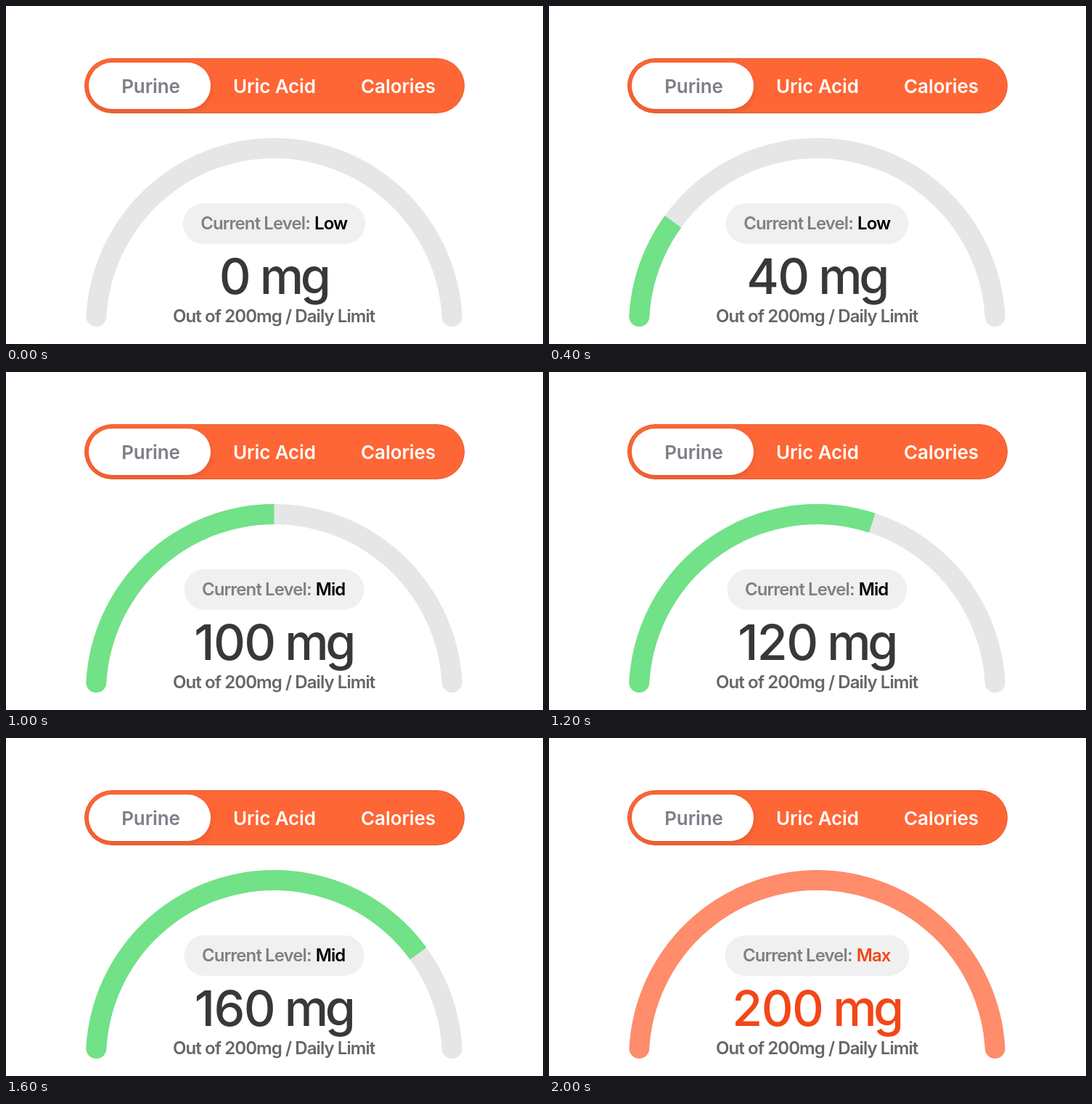
An HTML page that plays this animation: 740 px wide and 466 px high, repeating every 3000 ms.

```html
<!DOCTYPE html>
<html lang="en">
<head>
<meta charset="utf-8">
<title>Purine gauge</title>
<style>
  html, body { margin: 0; width: 100%; height: 100%; overflow: hidden; background: #fff; }
  svg { display: block; width: 740px; height: 466px; }
  text { font-family: Inter, Roboto, sans-serif; font-weight: 560; font-optical-sizing: none; }
  .tab { font-size: 26px; letter-spacing: -0.1px; fill: #fff; text-anchor: middle; }
  .tab.on { fill: #7b7f88; }
  .small { font-size: 24px; letter-spacing: -0.92px; }
  .big { font-size: 68px; font-weight: 500; text-anchor: middle; white-space: pre; }
  #amount { letter-spacing: -1.5px; }
  .unit { letter-spacing: -4.5px; }
</style>
</head>
<body>
<svg viewBox="0 0 740 466">
  <defs>
    <linearGradient id="warm" gradientUnits="userSpaceOnUse" x1="110" y1="0" x2="629" y2="0">
      <stop offset="0" stop-color="#80de7a"/>
      <stop offset="1" stop-color="#f4b50e"/>
    </linearGradient>
    <filter id="shade" x="-20%" y="-30%" width="140%" height="170%">
      <feDropShadow dx="0" dy="3" stdDeviation="4" flood-color="#000" flood-opacity="0.13"/>
    </filter>
    <clipPath id="barClip"><rect x="108" y="72" width="524" height="76" rx="38"/></clipPath>
    <clipPath id="ringClip"><path id="ringShape"/></clipPath>
  </defs>

  <g clip-path="url(#barClip)">
    <rect x="108" y="72" width="524" height="76" fill="#ff6635"/>
    <rect x="108.5" y="72.5" width="523" height="75" rx="37.5" fill="none" stroke="#000" stroke-opacity="0.12"/>
    <rect x="114" y="78" width="168" height="64" rx="32" fill="#fff" filter="url(#shade)"/>
  </g>
  <text class="tab on" x="199.5" y="120">Purine</text>
  <text class="tab" x="370" y="120">Uric Acid</text>
  <text class="tab" x="540.5" y="120">Calories</text>

  <path id="track" fill="#e6e6e6"/>
  <g clip-path="url(#ringClip)"><path id="fill"/></g>

  <rect id="pill" y="272" height="56" rx="28" fill="#f0f0f0"/>
  <text id="label" class="small" y="308" fill="#808080">Current Level:</text>
  <text id="level" class="small" y="308"></text>
  <text id="reading" class="big" x="368.5" y="397"><tspan id="amount"></tspan><tspan class="unit"> mg</tspan></text>
  <text class="small" x="369.2" y="436" fill="#666" text-anchor="middle">Out of 200mg / Daily Limit</text>
</svg>
<script>
  const LOOP = 3000, STEP = 200, LIMIT = 200;
  const CX = 369.5, CY = 441.5, OUTER = 259.5, INNER = 231.5, CAP_Y = 428;
  const $ = id => document.getElementById(id);
  const set = (id, attrs) => {
    for (const key in attrs) $(id).setAttribute(key, attrs[key]);
  };

  // pill width and colours by level
  const LEVELS = {
    Low:  { width: 251.5, arc: '#71e287', word: '#000', num: '#383838' },
    Mid:  { width: 248, arc: '#71e287', word: '#000', num: '#383838' },
    High: { width: 258, arc: 'url(#warm)', word: '#000', num: '#383838' },
    Max:  { width: 254, arc: '#ff8c6b', word: '#f24717', num: '#f24717' }
  };

  const levelOf = mg => mg >= 200 ? 'Max' : mg >= 180 ? 'High' : mg >= 100 ? 'Mid' : 'Low';

  // half ring with rounded feet
  function ringPath() {
    const reach = r => Math.sqrt(r * r - (CY - CAP_Y) ** 2);
    const o = reach(OUTER), i = reach(INNER), cap = (o - i) / 2;
    return `M${CX - o} ${CAP_Y}A${OUTER} ${OUTER} 0 0 1 ${CX + o} ${CAP_Y}` +
      `A${cap} ${cap} 0 0 1 ${CX + i} ${CAP_Y}` +
      `A${INNER} ${INNER} 0 0 0 ${CX - i} ${CAP_Y}` +
      `A${cap} ${cap} 0 0 1 ${CX - o} ${CAP_Y}Z`;
  }

  function wedgePath(part) {
    if (part <= 0) return '';
    if (part >= 1) return ringPath();
    const a = part * Math.PI, r = 300;
    return `M${CX} ${CY}v9H${CX - r}V${CY}` +
      `A${r} ${r} 0 0 1 ${CX - r * Math.cos(a)} ${CY - r * Math.sin(a)}Z`;
  }

  let shown = -1;
  function draw(time) {
    const mg = 20 * Math.min(10, Math.floor((time % LOOP) / STEP));
    if (mg === shown) return;
    shown = mg;
    const name = levelOf(mg), look = LEVELS[name];
    const left = CX - look.width / 2;
    set('fill', { d: wedgePath(mg / LIMIT), fill: look.arc });
    set('pill', { x: left, width: look.width });
    set('label', { x: left + 24.4 });
    set('level', { x: left + 181.3, fill: look.word });
    set('reading', { fill: look.num });
    $('level').textContent = name;
    $('amount').textContent = mg;
  }

  set('track', { d: ringPath() });
  set('ringShape', { d: ringPath() });
  draw(0);

  const start = performance.now();
  function tick() {
    draw(Math.max(0, performance.now() - start));
    requestAnimationFrame(tick);
  }
  requestAnimationFrame(tick);
</script>
</body>
</html>
```
